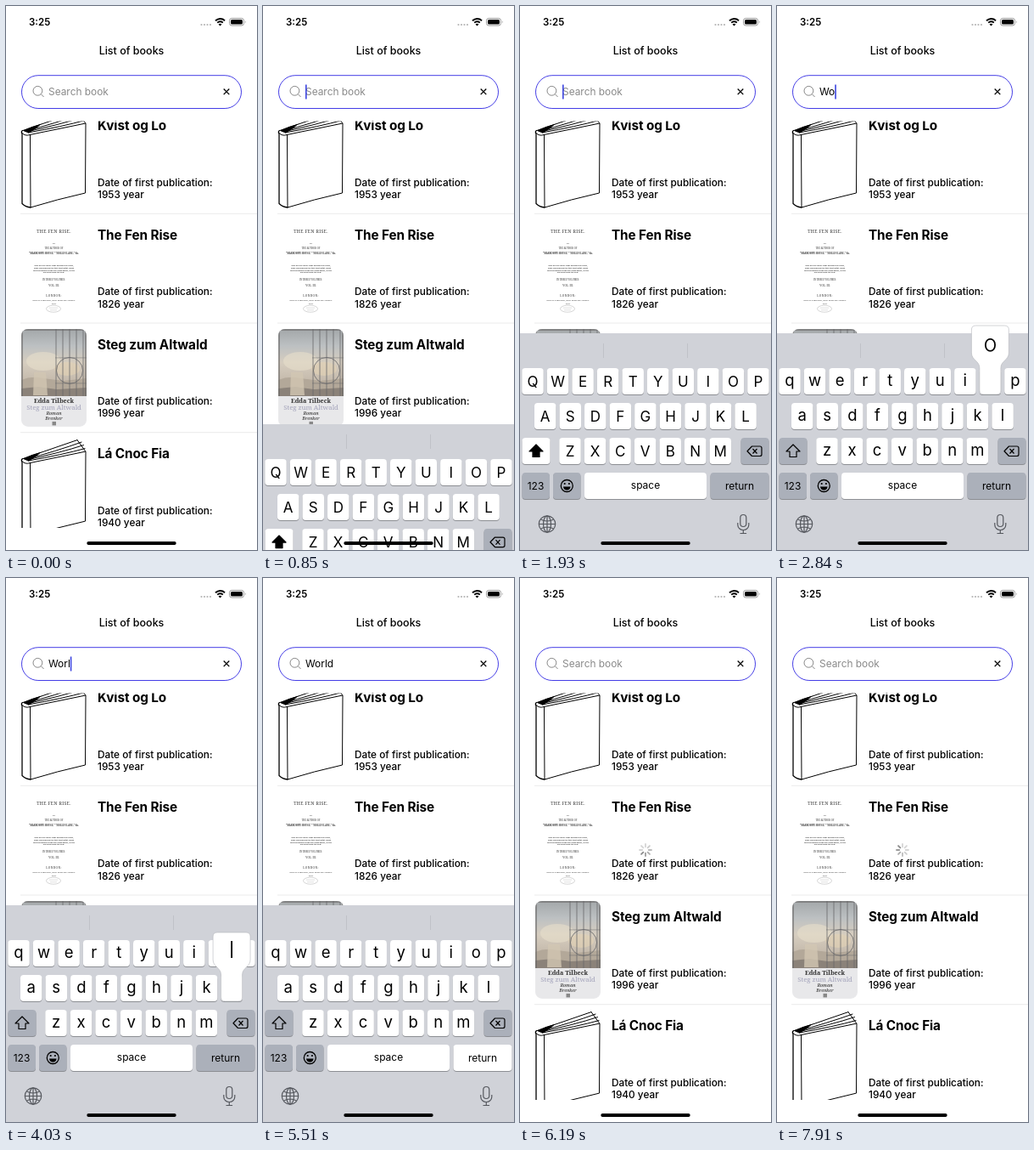
These frames come from a looping animation (296 px wide and 640 px high, 8 s). An HTML page:

```html
<!DOCTYPE html>
<html lang="en">
<head>
<meta charset="utf-8">
<title>List of books</title>
<style>
  html, body { margin: 0; width: 100%; height: 100%; overflow: hidden; background: #fff; }
  svg { display: block; width: 100vw; height: 100vh; font-family: Inter, Roboto, sans-serif; }
  .mid { text-anchor: middle; }
  .serif { font-family: "Noto Serif", "Liberation Serif", serif; text-anchor: middle; }
  .name { font-size: 15.3px; font-weight: 700; letter-spacing: -.1px; }
  .date { font-size: 11.8px; font-weight: 500; }
  .field { font-size: 11.9px; }
</style>
</head>
<body>
<svg id="stage" viewBox="0 0 296 640" xmlns="http://www.w3.org/2000/svg"></svg>
<script>
const LOOP = 8000, STEP = 110, KEYS_H = 255, PITCH = 128.7;
const OPEN = 740, SUBMIT = 5630;
const presses = [
  [2490, 2720, 'W'], [2840, 3250, 'o'], [3470, 3920, 'r'],
  [4030, 4520, 'l'], [4760, 5250, 'd']
];
const keyRows = [
  { keys: 'qwertyuiop', x: 15, y: 426 },
  { keys: 'asdfghjkl', x: 29.7, y: 467 },
  { keys: 'zxcvbnm', x: 59, y: 508 }
];
const KEY_GAP = 29.55;

const text = (x, y, s, attrs = '') => `<text x="${x}" y="${y}" ${attrs}>${s}</text>`;
const serif = (y, s, size, attrs = '') => text(38.5, y, s, `class="serif" font-size="${size}" ${attrs}`);

// Covers are drawn in a box of 77 by 115
const blankBook = `<g fill="none" stroke="#000" stroke-width="1" stroke-linejoin="round" stroke-linecap="round">
  <path d="M2 24L66 2M4 25Q42 15 71 4.500M6 25.500Q46 17 73.500 8M8 26.500Q50 19 75 12"/>
  <path d="M66 2L75.500 15"/>
  <path d="M2 24Q12 19 24 16Q18 22 9 27z" fill="#000" stroke="none"/>
  <path d="M1.500 24Q-.5 25 1 28L1 110Q5 114 11 114.500" stroke-width="1.300"/>
  <path d="M1 27Q5 31 10 29L76 15.500 75.500 97.500Q42 105 11 114.500L10.500 29"/></g>`;

const titlePage = `<g fill="#333">`
  + serif(16.200, 'THE FEN RISE.', 5.2, 'font-weight="500" letter-spacing=".35"')
  + serif(28.500, 'BY', 2.4)
  + serif(35, 'THE AUTHOR OF', 2.7)
  + serif(41, '“MARROWBY HOUSE,” “HOLLIN LANE,” &amp;c.', 2.7, 'font-weight="600"')
  + ['Now all the valley slept beneath the snow,', 'none who passed the gate that night could',
     'tell the lantern from the rising moon, or the', 'old road from the new.']
    .map((s, i) => serif(55 + i * 2.7, s, 2.2, 'font-style="italic" font-weight="600"')).join('')
  + serif(72, 'IN THREE VOLUMES.', 2.7)
  + serif(79, 'VOL. III.', 3.2)
  + serif(91, 'LONDON:', 3.4, 'letter-spacing=".4"')
  + serif(96, 'HOLLIS TARWOOD, NEW MARLOW STREET.', 2.4)
  + serif(100, '1826.', 2.4)
  + `</g><ellipse cx="38" cy="105" rx="8.500" ry="4" fill="none" stroke="#bbb" stroke-width=".6"/>
  <path d="M33 104h10M34 106.500h8" stroke="#ccc" stroke-width=".6"/>`;

const painting = `<g clip-path="url(#round)"><rect width="77" height="115" fill="#e8e8ea"/>
  <rect width="77" height="79" fill="url(#sky)"/>
  <ellipse cx="26" cy="38" rx="20" ry="11" fill="#e8dfcb" opacity=".6"/>
  <ellipse cx="54" cy="47" rx="15" ry="8" fill="#e3d3b4" opacity=".6"/>
  <path d="M0 60Q12 55 26 58L50 61 77 58V79H0z" fill="#b3a899"/>
  <path d="M0 70L20 68 42 71 77 69V79H0z" fill="#8b8279"/>
  <path d="M15 51h14l2 27H14z" fill="#d2c7b3" opacity=".8"/>
  <path d="M0 0h77v2H0zM0 0h2v79H0zM75 0h2v79h-2z" fill="#6b6a69" opacity=".6"/>
  <g fill="none" stroke="#68676a" stroke-width=".8"><path d="M41 0V79M49 0V79M57 0V79M65 0V79M73 0V79"/>
  <circle cx="57" cy="49" r="15.500"/><path d="M40 34H77M40 64H77" opacity=".6"/></g>`
  + serif(87, 'Edda Tilbeck', 7.2, 'font-weight="600" fill="#333"')
  + serif(95, 'Steg zum Altwald', 7.8, 'fill="#a2a2ba"')
  + serif(101.200, 'Roman', 5, 'font-style="italic" font-weight="600" fill="#555"')
  + serif(106.700, 'Brenker', 5, 'font-style="italic" font-weight="600" fill="#555"')
  + `<rect x="36.500" y="109" width="4.500" height="4.500" fill="#888"/></g>`;

const books = [
  ['Kvist og Lo', 1953, blankBook],
  ['The Fen Rise', 1826, titlePage],
  ['Steg zum Altwald', 1996, painting],
  ['Lá Cnoc Fia', 1940, blankBook]
];

const bookRow = ([name, year, cover], i) => `<g transform="translate(0 ${i * PITCH})">
  <g transform="translate(18 122.500)">${cover}</g>
  ${text(108, 146.300, name, 'class="name"')}
  ${text(108, 211.500, 'Date of first publication:', 'class="date"')}
  ${text(108, 226, year + ' year', 'class="date"')}
  <path d="M17 244.300H296" stroke="#ebebeb"/></g>`;

const keyBox = (x, y, w, fill = '#fff', id = '') =>
  `<rect x="${x}" y="${y + 1}" width="${w}" height="31" rx="4" fill="#8c8e93"/>
   <rect ${id && `id="${id}"`} x="${x}" y="${y}" width="${w}" height="31" rx="4" fill="${fill}"/>`;

const eachKey = draw => keyRows.map(r =>
  [...r.keys].map((k, i) => draw(k, r.x + i * KEY_GAP, r.y)).join('')).join('');

const GREY = '#abb0ba';
const keyboard = `<rect y="385" width="296" height="262" fill="#d0d2d8"/>
  <path d="M98.500 397v17M197.500 397v17" stroke="#c0c2c8"/>
  ${eachKey((k, x, y) => keyBox(x - 12.75, y, 25.5))}
  <g id="caps">${eachKey((k, x, y) => text(x, y + 21.500, k.toUpperCase(), 'class="mid" font-size="17"'))}</g>
  <g id="lower">${eachKey((k, x, y) => text(x, y + 20.500, k, 'class="mid" font-size="18.500"'))}</g>
  ${keyBox(2.500, 508, 33, '#fff', 'shift')}
  <path id="arrow" d="M19 516l8 8h-4v6.500h-8V524h-4z" stroke="#000" stroke-width="1.200" stroke-linejoin="round"/>
  ${keyBox(260.500, 508, 33, GREY)}
  <path d="M273.500 518h9.500q2 0 2 2v7.500q0 2-2 2h-9.500l-5.500-5.750zM274.500 521l5 5.500M279.500 521l-5 5.500" fill="none" stroke="#000" stroke-width="1.200" stroke-linejoin="round"/>
  ${keyBox(2.500, 549, 32.5, GREY)}${text(18.500, 568.500, '123', 'class="mid" font-size="12"')}
  ${keyBox(39, 549, 32.5, GREY)}
  <circle cx="55.300" cy="564.500" r="7" fill="none" stroke="#000" stroke-width="1.300"/>
  <path d="M51 565.500h8.600q-.5 4-4.300 4t-4.300-4z"/>
  <circle cx="52.700" cy="562" r="1.100"/><circle cx="57.900" cy="562" r="1.100"/>
  ${keyBox(76, 549, 144)}${text(148, 567.500, 'space', 'class="mid" font-size="12"')}
  ${keyBox(224.500, 549, 69, GREY, 'return')}${text(259, 568.500, 'return', 'class="mid" font-size="12"')}
  <g fill="none" stroke="#55585e" stroke-width="1.200">
    <circle cx="32" cy="609.500" r="9.700"/><ellipse cx="32" cy="609.500" rx="4.500" ry="9.700"/>
    <path d="M32 600v19M22.300 609.500h19.400M24.500 604q7.500 4 15 0M24.500 615q7.500-4 15 0"/>
    <rect x="259.800" y="598.500" width="7" height="14" rx="3.500"/>
    <path d="M256.800 608v2.500a6.500 6 0 0 0 13 0V608M263.300 616.500v4M259.500 620.500h7.600"/></g>
  <g id="popup"><path fill="#fff" stroke="#b4b6bb" stroke-width=".6"/>
    <text class="mid" font-size="27" font-weight="300"></text></g>`;

const spokes = Array.from({ length: 8 }, (_, i) =>
  `<path class="spoke" d="M0-3.700V-7" transform="rotate(${i * 45})"/>`).join('');

const stage = document.getElementById('stage');
stage.innerHTML = `<defs>
    <clipPath id="list"><path d="M0 135.500H296V614H0z"/></clipPath>
    <clipPath id="round"><rect width="77" height="115" rx="8"/></clipPath>
    <linearGradient id="sky" x2="0" y2="1"><stop stop-color="#a3a7a9"/><stop offset=".25" stop-color="#bcc0c2"/>
      <stop offset=".5" stop-color="#d6cdbf"/><stop offset=".8" stop-color="#c3b8aa"/></linearGradient></defs>
  <rect width="296" height="640" fill="#fff"/>
  ${text(27, 23, '3:25', 'font-size="11.500" font-weight="600"')}
  <g fill="#b5b5b5">${[0, 1, 2, 3].map(i => `<circle cx="${230.500 + i * 3.5}" cy="22" r="1.100"/>`).join('')}</g>
  <g fill="none" stroke="#000" stroke-width="1.900"><path d="M247 17.200q5.500-4.600 11 0M249.200 19.600q3.300-2.800 6.600 0"/></g>
  <path d="M252.500 23.500l-2-2q2-1.500 4 0z"/>
  <rect x="263.500" y="14.500" width="17" height="8.500" rx="2.700" fill="none" stroke="#999"/>
  <rect x="265" y="16" width="14" height="5.500" rx="1.500"/><path d="M282 17.300q1.600 1.500 0 3z" fill="#999"/>
  ${text(148, 57, 'List of books', 'class="mid" font-size="12.500" font-weight="500"')}
  <rect x="18.500" y="81.700" width="259" height="38.800" rx="19.400" fill="#fff" stroke="#443de6"/>
  <path d="M42.800 99.800a5.400 5.400 0 1 1-10.800 0a5.400 5.400 0 1 1 10.800 0M41.300 103.700l3.300 3.300" fill="none" stroke="#858585"/>
  <text id="query" class="field" x="50" y="105"></text>
  <rect id="cursor" y="92.500" width="1.600" height="17" fill="#3d45e0"/>
  <path d="M256.700 97.500l6.600 6.600M263.300 97.500l-6.600 6.600" stroke="#000" stroke-width="1.300"/>
  <g clip-path="url(#list)">${books.map(bookRow).join('')}</g>
  <g id="spinner" transform="translate(148 320)" stroke="#777" stroke-width="1.800" stroke-linecap="round">${spokes}</g>
  <g id="keyboard">${keyboard}</g>
  <rect x="95.300" y="630" width="105.400" height="4" rx="2"/>`;

const $ = id => document.getElementById(id);
const show = (id, on) => $(id).setAttribute('display', on ? 'inline' : 'none');
const spring = ms => { const p = 0.015 * Math.max(0, ms); return (1 + p) * Math.exp(-p); };
const held = (t, from) => Math.floor((t - from) / STEP) * STEP;

function keyboardDrop(t) {
  if (t < OPEN || t >= 6180) return KEYS_H;
  if (t >= SUBMIT) return KEYS_H * (1 - spring(held(t, SUBMIT) + 30));
  return t < 1400 ? KEYS_H * spring(held(t, OPEN) + 20) : 0;
}

function cursorAlpha(t) {
  if (t < OPEN || t >= 5360) return 0;
  if (t >= 1640 && t < 1930) return t < 1760 ? 0.5 : 0;
  return t >= 5250 ? 0.5 : 1;
}

function drawPopup(t) {
  const press = presses.find(([a, b]) => t >= a && t < b);
  show('popup', press);
  if (!press) return;
  const key = press[2].toLowerCase();
  const row = keyRows.find(r => r.keys.includes(key));
  const x = row.x + row.keys.indexOf(key) * KEY_GAP, y = row.y;
  const [shape, label] = $('popup').children;
  shape.setAttribute('d', `M${x - 22} ${y - 45}q0-5 5-5h34q5 0 5 5v27c0 9-9.5 9-9.5 18v26q0 5-5 5h-15q-5 0-5-5v-26c0-9-9.5-9-9.5-18z`);
  label.setAttribute('x', x);
  label.setAttribute('y', y - 20);
  label.textContent = press[2];
}

function draw(t) {
  const typed = t < SUBMIT ? presses.filter(p => t >= p[0]).map(p => p[2]).join('') : '';
  const query = $('query');
  query.textContent = typed || 'Search book';
  query.setAttribute('fill', typed ? '#000' : '#8a8a8a');
  $('cursor').setAttribute('x', 50 + (typed ? query.getComputedTextLength() : 0));
  $('cursor').setAttribute('opacity', cursorAlpha(t));

  const drop = keyboardDrop(t), caps = t < 2720;
  show('keyboard', drop < KEYS_H);
  $('keyboard').setAttribute('transform', `translate(0 ${drop.toFixed(2)})`);
  show('caps', caps);
  show('lower', !caps);
  $('shift').setAttribute('fill', caps ? '#fff' : GREY);
  $('arrow').setAttribute('fill', caps ? '#000' : 'none');
  $('return').setAttribute('fill', t >= 5510 ? '#fff' : GREY);
  drawPopup(t);

  show('spinner', t >= SUBMIT);
  const head = Math.floor(t / 100);
  document.querySelectorAll('.spoke').forEach((s, i) => {
    const age = (((head - i) % 8) + 8) % 8;
    s.setAttribute('opacity', Math.max(0.3, 0.85 - age * 0.12));
  });
}

const begin = performance.now();
function tick() {
  draw((performance.now() - begin) % LOOP);
  requestAnimationFrame(tick);
}
draw(0);
requestAnimationFrame(tick);
</script>
</body>
</html>
```
